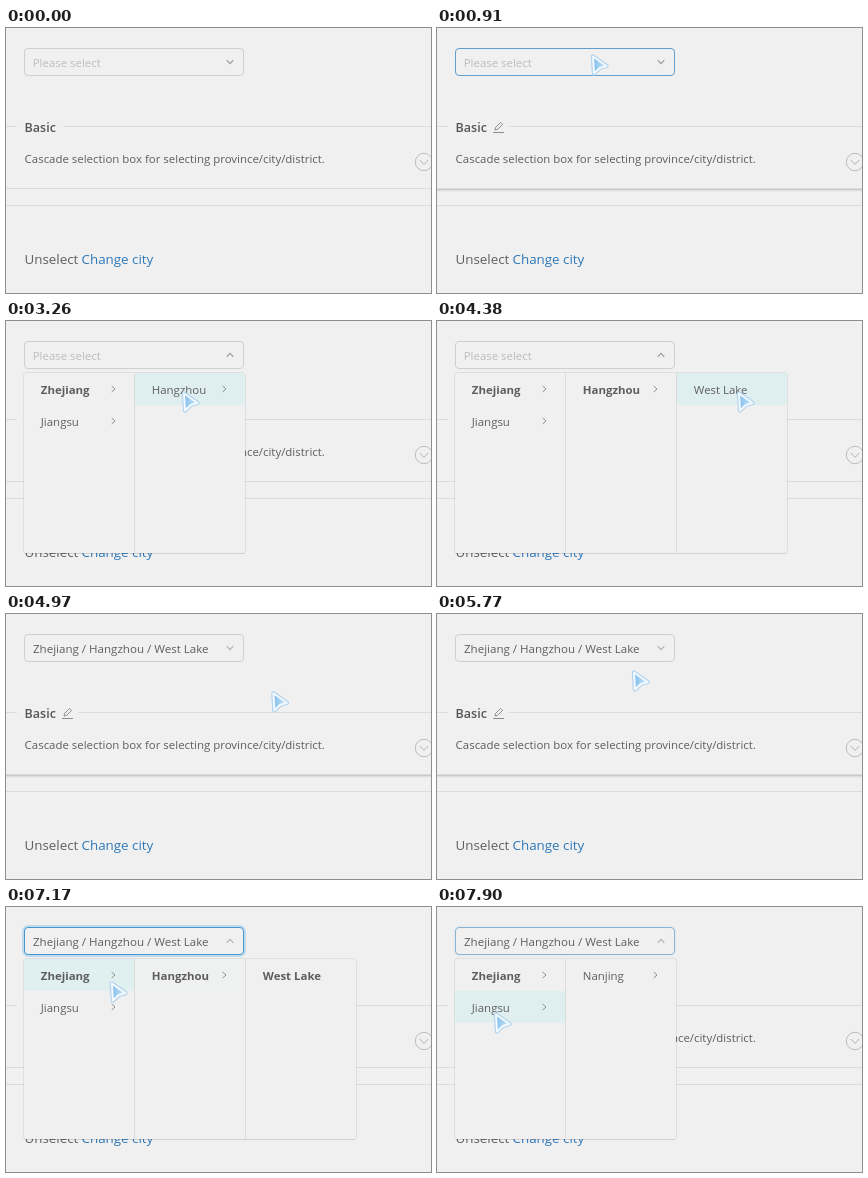
Animation of 425 by 265 pixels, one loop 8000 ms. Source, as an HTML page with a canvas:

```html
<!DOCTYPE html>
<html lang="en">
<head>
<meta charset="utf-8">
<title>Cascader</title>
<style>
html, body { margin: 0; width: 100%; height: 100%; overflow: hidden; background: #f0f0f0; }
canvas { display: block; width: 425px; height: 265px; }
</style>
</head>
<body>
<canvas id="stage"></canvas>
<script>
const W = 425, H = 265, LOOP = 8000;
const BG = '#f0f0f0', INK = '#5e5e5e', LINE = '#dcdcdc';
const FONT = '"Open Sans", "Noto Sans", sans-serif';
const COL = 111, TOP = 52, BOTTOM = 233, LEFT = 18;
const canvas = document.getElementById('stage');
const ctx = canvas.getContext('2d');
const dpr = window.devicePixelRatio || 1;
canvas.width = W * dpr;
canvas.height = H * dpr;

// time, x, y of the pointer tip
const PATH = [
  [100, 404, 83], [450, 262, 46], [810, 154, 26], [1460, 154, 26],
  [1760, 124, 43], [2160, 85, 72], [2600, 85, 72], [3260, 176, 70],
  [3680, 176, 70], [4280, 297, 69], [4380, 300, 70], [4680, 300, 70],
  [5370, 218, 86], [5770, 195, 56], [6170, 193, 45], [6620, 193, 45],
  [7170, 104, 74], [7570, 57, 105], [8000, 57, 105]
];
const ITEMS = [
  { label: 'Zhejiang', col: 0, row: 0, hover: [[1980, 2850], [7020, 7330]], bold: 2600, more: true },
  { label: 'Jiangsu', col: 0, row: 1, hover: [[7350, 9000]], more: true },
  { label: 'Hangzhou', col: 1, row: 0, hover: [[2880, 3980], [6800, 7020]], bold: 3720, end: 7780, more: true },
  { label: 'Nanjing', col: 1, row: 0, hover: [], start: 7780, more: true },
  { label: 'West Lake', col: 2, row: 0, hover: [[4000, 6000]], bold: 6000 }
];

const clamp = v => Math.max(0, Math.min(1, v));
const smooth = v => v * v * (3 - 2 * v);
const within = (t, a, b) => t >= a && t < b;

// 0..1 state switched on at a and off at b, with a transition
const fade = (t, a, b, ms = 250) =>
  smooth(clamp((t - a) / ms)) * (1 - smooth(clamp((t - b) / ms)));
const fades = (t, spans, ms) => Math.max(0, ...spans.map(s => fade(t, s[0], s[1], ms)));

function openness(t, a, b) {
  const rise = 1 - Math.pow(1 - clamp((t - a) / 200), 4);
  return rise * (1 - Math.pow(clamp((t - b) / 200), 4));
}

const mix = (a, b, k) => a.map((v, i) => Math.round(v + (b[i] - v) * k));

function pointerAt(t) {
  const i = PATH.findIndex(p => p[0] > t);
  if (i < 1) return null;
  const [t0, x0, y0] = PATH[i - 1], [t1, x1, y1] = PATH[i];
  const k = (t - t0) / (t1 - t0);
  return [x0 + (x1 - x0) * k, y0 + (y1 - y0) * k];
}

function text(str, x, y, color = INK, size = 11.44, weight = 400) {
  ctx.font = `${weight} ${size}px ${FONT}`;
  ctx.fillStyle = color;
  ctx.fillText(str, x, y);
}

function rule(x0, x1, y, color = LINE) {
  ctx.fillStyle = color;
  ctx.fillRect(x0, y, x1 - x0, 1);
}

function stroke(points, color, width = 1, close = false) {
  ctx.beginPath();
  points.forEach(p => ctx.lineTo(p[0], p[1]));
  if (close) ctx.closePath();
  ctx.strokeStyle = color;
  ctx.lineWidth = width;
  ctx.stroke();
}

function frame(x, y, w, h, r, color, width = 1) {
  ctx.beginPath();
  ctx.roundRect(x, y, w, h, r);
  ctx.strokeStyle = color;
  ctx.lineWidth = width;
  ctx.stroke();
}

function faded(alpha, draw) {
  if (alpha <= 0) return;
  ctx.save();
  ctx.globalAlpha *= alpha;
  draw();
  ctx.restore();
}

function drawPencil() {
  rule(56, 67, 104, '#8c8c8c');
  stroke([[58, 102], [58.6, 99.4], [63.6, 94.4], [65.6, 96.4], [60.6, 101.4]], '#8c8c8c', 1, true);
}

function drawCard(t) {
  const over = fades(t, [[80, 1760], [4700, 6640]], 220);
  const titled = within(t, 90, 1880) || within(t, 4700, 6760);
  rule(0, 11, 98);
  rule(titled ? 72 : 57, W, 98);
  rule(0, W, 160);
  rule(0, W, 177);
  faded(over, () => {
    rule(0, W, 161, '#c9c9c9');
    rule(0, W, 162, '#dedede');
    rule(0, W, 163, '#eaeaea');
  });
  text('Basic', 18.6, 104, '#555', 12.5, 600);
  if (titled) drawPencil();
  text('Cascade selection box for selecting province/city/district.', 18.6, 135);
  ctx.beginPath();
  ctx.arc(418, 134, 8.7, 0, 7);
  ctx.strokeStyle = '#bdbdbd';
  ctx.lineWidth = 1;
  ctx.stroke();
  stroke([[413.8, 132], [418, 136.4], [422.2, 132]], '#b4b4b4');
  text('Unselect', 18.5, 236, INK, 13.38);
  text('Change city', 75.5, 236, '#2f78b9', 13.38);
}

function drawInput(t) {
  const hover = fades(t, [[620, 1760], [6040, 6800]], 250);
  const focus = fades(t, [[1000, 2460], [6340, 7770]], 260);
  const filled = t >= 4620;
  faded(focus ** 3, () => frame(17.5, 19.5, 221, 29, 5, 'rgba(40,150,225,.24)', 3));
  ctx.fillStyle = BG;
  ctx.fillRect(19, 21, 218, 26);
  const rim = mix(mix([207, 207, 207], [98, 158, 203], hover), [70, 150, 208], focus);
  frame(18.5, 20.5, 219, 27, 3.5, `rgb(${rim})`);
  if (filled) text('Zhejiang / Hangzhou / West Lake', 27, 39, INK, 11.55);
  else text('Please select', 26.7, 39, '#bdbdbd');

  const clear = fade(t, 6080, 6760, 150);
  const turn = Math.max(fade(t, 1030, 4620, 200), fade(t, 6500, 9000, 200));
  faded(1 - clear, () => {
    ctx.translate(224, 34);
    ctx.rotate(Math.PI * turn);
    stroke([[-3.3, -1.8], [0, 1.6], [3.3, -1.8]], filled ? '#b0b0b0' : '#9a9a9a', 1.1);
  });
  faded(clear, () => {
    ctx.beginPath();
    ctx.arc(224, 33.5, 6, 0, 7);
    ctx.fillStyle = '#c2c2c2';
    ctx.fill();
    stroke([[222, 31.5], [226, 35.5]], BG);
    stroke([[226, 31.5], [222, 35.5]], BG);
  });
}

function drawItem(item, t) {
  const x = LEFT + item.col * COL, y = TOP + item.row * 32;
  faded(fades(t, item.hover, 180), () => {
    ctx.fillStyle = '#dfefef';
    ctx.fillRect(x, y, COL - 1, 32);
  });
  const bold = t >= (item.bold || LOOP);
  text(item.label, x + 16.8, y + 21, INK, 11.44, bold ? 700 : 400);
  if (item.more) stroke([[x + 87.7, y + 13], [x + 91, y + 16], [x + 87.7, y + 19]], '#8f8f8f');
}

function drawMenu(t) {
  const open = Math.max(openness(t, 1040, 4620), openness(t, 6507, 9000));
  let cols = 1;
  if (t >= 2480) cols = 2;
  if (within(t, 3600, 7780)) cols = 3;
  faded(open, () => {
    ctx.translate(0, TOP);
    ctx.scale(1, 0.8 + 0.2 * open);
    ctx.translate(0, -TOP);
    const w = cols * COL - 1, h = BOTTOM - TOP - 1;
    ctx.fillStyle = BG;
    ctx.fillRect(LEFT, TOP, w, h);
    frame(LEFT - 0.5, TOP - 0.5, w + 1, h + 1, 3, 'rgba(0,0,0,.07)');
    stroke([[LEFT + 1, BOTTOM - 0.5], [LEFT + w, BOTTOM - 0.5]], 'rgba(0,0,0,.06)');
    ctx.fillStyle = LINE;
    for (let i = 1; i < cols; i++) ctx.fillRect(LEFT + i * COL - 1, TOP, 1, h);
    for (const item of ITEMS) {
      if (item.col < cols && within(t, item.start || 0, item.end || LOOP)) drawItem(item, t);
    }
  });
}

function drawPointer(t) {
  const p = pointerAt(t);
  if (!p) return;
  ctx.save();
  ctx.translate(p[0], p[1]);
  ctx.lineJoin = 'round';
  const shape = [[2, 2.5], [15.5, 12], [8.8, 14], [3, 19.5]];
  stroke(shape, '#b4d3ec', 4.4, true);
  const g = ctx.createLinearGradient(2, 0, 14, 0);
  g.addColorStop(0, '#82bdea');
  g.addColorStop(1, '#c4e3f8');
  ctx.fillStyle = g;
  ctx.fill();
  stroke(shape, '#f2f9ff', 2, true);
  ctx.restore();
}

function render(t) {
  ctx.setTransform(dpr, 0, 0, dpr, 0, 0);
  ctx.fillStyle = BG;
  ctx.fillRect(0, 0, W, H);
  drawCard(t);
  drawInput(t);
  drawMenu(t);
  drawPointer(t);
}

const start = performance.now();
function tick() {
  render((performance.now() - start) % LOOP);
  requestAnimationFrame(tick);
}
tick();
</script>
</body>
</html>
```
